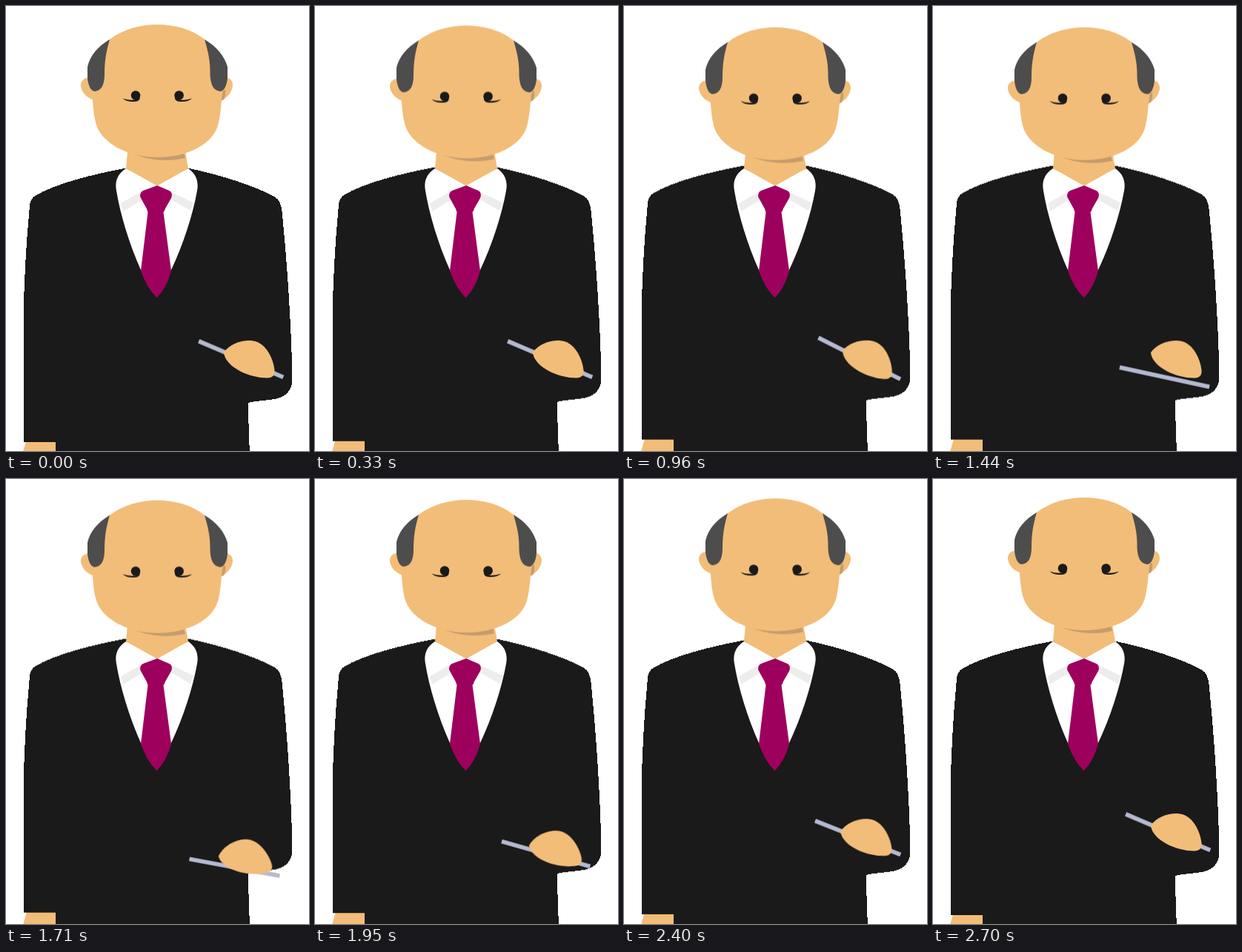
Recreate the animation shown at these times as an HTML page. Size 409 by 600 pixels, loop 3600 ms.

```html
<!DOCTYPE html>
<html lang="en">
<head>
<meta charset="utf-8">
<title>Man with a pen</title>
<style>
  html, body { margin: 0; width: 100%; height: 100%; overflow: hidden; background: #fff; }
  svg { display: block; width: 409px; height: 600px; }

  .skin { fill: #f2bd78; }
  .shade { fill: #c69c6d; }
  .hair { fill: #4d4d4d; }
  .suit { fill: #1a1a1a; }
  .shirt { fill: #fff; }
  .fold { fill: #efedec; }
  .tie { fill: #9e005d; }
  .pen { fill: #b5bad1; }

  .head, .jacket, .hand, .pen { animation: 3600ms linear infinite; }
  .head { animation-name: nod; }
  .jacket { animation-name: breathe; shape-rendering: crispEdges; }
  .hand { animation-name: grip; transform-origin: 330px 482px; }
  .pen { animation-name: drop; }

  @keyframes nod {
    0%, 75%, 100% { transform: translateY(0); }
    25%, 50% { transform: translateY(3.7px); }
  }
  @keyframes breathe {
    0%, 75%, 100% { transform: translateY(0); }
    25%, 50% { transform: translateY(-3.4px); }
  }
  @keyframes grip {
    0%, 22.5%, 75%, 100% { transform: translate(0, 0) rotate(0deg); }
    26.667% { transform: translate(0, 0) rotate(3.8deg); }
    29.167% { transform: translate(0, 0) rotate(6deg); }
    40% { transform: translate(0, 0) rotate(0deg); }
    47.5% { transform: translate(-5px, 34.5px) rotate(-11deg); }
    60% { transform: translate(-2.5px, 13px) rotate(-2.6deg); }
  }
  @keyframes drop {
    0%, 22.5%, 75%, 100% { transform: translate(317.2px, 476.2px) rotate(23.1deg); }
    26.667% { transform: translate(317.7px, 475.2px) rotate(26.8deg); }
    29.167% { transform: translate(318px, 474.6px) rotate(29deg); }
    40% { transform: translate(312.5px, 500.3px) rotate(12.2deg); }
    47.5% { transform: translate(308.5px, 523.8px) rotate(10.5deg); }
    60% { transform: translate(314.4px, 489.8px) rotate(20.4deg); }
  }
</style>
</head>
<body>
<svg viewBox="0 0 409 600">
  <path class="skin" d="M29 580L23 601H67V580Z"/>

  <path class="suit jacket" d="M162 218.500C116 227 66 240 40 255.500Q33 259.500 32 269C27.500 318 23.500 375 23.500 440L24.500 588H67V620H329.500L326.500 535C335 533 346 532 356 531Q386.500 528 386.500 503C385.500 440 380 350 372.500 277Q371 262 363 257.500C335 242 287 227 245 218.500Z"/>

  <path class="shirt" d="M162 219C151 226 146.500 236 149 249C154 280 166 320 182.500 357L203.500 390L222.500 357C240 320 252.500 280 258 249C260.500 236 256 226 246 219L204 238Z"/>
  <path class="fold" d="M183 250L155 266L158 277L186 260ZM223 251L253 265L249 276L221 260Z"/>

  <path class="skin" d="M165 185H240L246 219L204 242.500L162 219Z"/>

  <path class="tie" d="M204 242L220.500 249Q223 250 223.700 253Q224.500 256 223 259L215 273Q214 277 212.500 278L223 357Q217 380 203.500 393.500Q190 380 182 357L191.500 278Q191 277 190 273.500L181.500 258Q180.500 256 181.500 253Q182.500 250 185 249Z"/>

  <g class="head">
    <path class="shade" d="M165 196C188 208 217 211 242 205L239 194Z"/>
    <path class="skin" d="M114 97C106 96 100.500 101 101 108C102.500 117 109 123.500 118 126.500ZM295 96C302 96 306.500 101 306 107.500C304.500 117 299 123.500 290 128Z"/>
    <path class="shade" d="M292 114L296 113Q297 121 294 126L290 128Z"/>
    <path class="skin" d="M140 45C159 31 181 25 204 25C228 25 250 31 268 45L290 75L293 113C290 128 291 139 287 157C281 187 244 204 204 204C164 204 127 184 121 157C117 141 118 129 115 113L115 80Z"/>
    <path class="hair" d="M140 45C123 55 113 68 110 82V97C111 108 115 115 120 115C129 114 133 106 133 92C133 75 135 62 140 45Z"/>
    <path class="hair" d="M268 45C285 55 295 68 299 82V97C298 108 294 115 289 115C280 114 276 106 275.500 92C276 75 273 62 268 45Z"/>
    <g id="eye" class="suit">
      <circle cx="175" cy="120.500" r="6.300"/>
      <path d="M157.500 124.500Q166 127.500 174 126.500L180.500 122Q182 128.500 173 129Q163 129.500 157.500 124.500Z"/>
    </g>
    <use href="#eye" transform="matrix(-1 0 0 1 408.600 0)"/>
  </g>

  <rect class="pen" x="-62" y="-2.800" width="124" height="5.600"/>
  <path class="skin hand" d="M294 467C302 456 317 450.500 330 451C350 452 360.500 474 362.500 491C363 498 360 501 353 501.500C331 502 296 488 294 467Z"/>
</svg>
</body>
</html>
```
